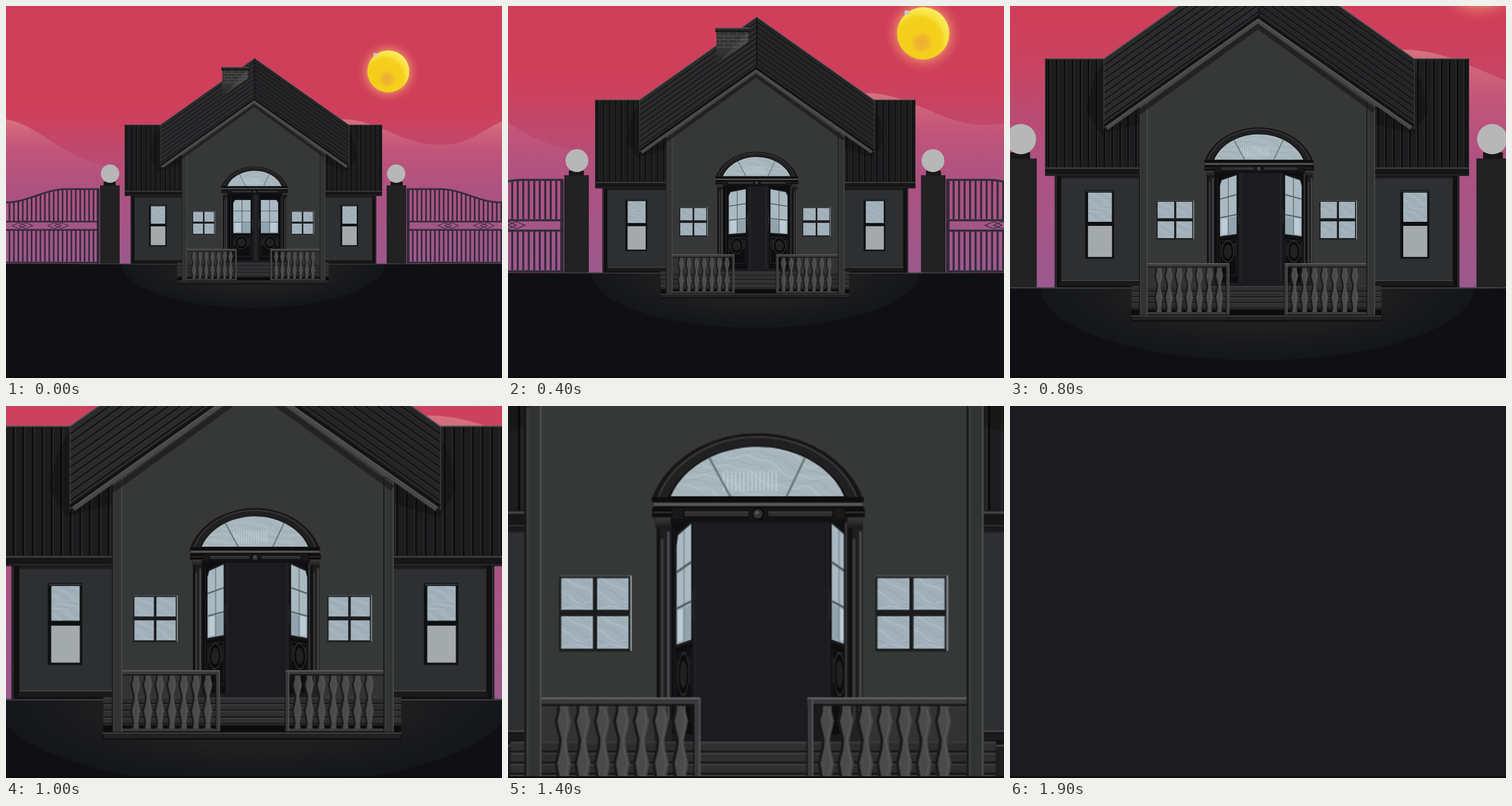
These frames come from a looping animation (864x648 px, 2100 ms). An HTML page with a canvas:

```html
<!DOCTYPE html>
<html lang="en">
<head>
<meta charset="utf-8">
<title>Into the house</title>
<style>
html, body { margin: 0; width: 100%; height: 100%; overflow: hidden; background: #0f0f14; }
canvas { display: block; width: 100%; height: 100%; }
</style>
</head>
<body>
<canvas id="stage" width="864" height="648"></canvas>
<script>
const WIDTH = 864, HEIGHT = 648;
const screen2d = document.getElementById('stage').getContext('2d');
const paper = document.createElement('canvas');
paper.width = WIDTH;
paper.height = HEIGHT;
const ctx = paper.getContext('2d');

const LOOP = 2100, STEP = 100, LAST = 19;
const FOCUS = { x: 432, y: 385 };
// Beyond this zoom the picture is enlarged softly instead of redrawn sharper.
const MAX_DETAIL = 1.7;
// Camera distance at chosen steps; zoom is its inverse.
const DISTANCE = [[0, 1], [14, 0.3125], [17, 0.1825], [19, 0.088]];

function distanceAt(step) {
  const i = DISTANCE.findIndex(([s]) => s >= step);
  if (i === 0) return 1;
  const [s0, d0] = DISTANCE[i - 1], [s1, d1] = DISTANCE[i];
  return d0 + (d1 - d0) * (step - s0) / (s1 - s0);
}

// Drawing helpers
function rect(color, x0, y0, x1, y1) {
  ctx.fillStyle = color;
  ctx.fillRect(x0, y0, x1 - x0, y1 - y0);
}
function trace(points) {
  ctx.beginPath();
  points.forEach(([x, y]) => ctx.lineTo(x, y));
}
function poly(color, points) {
  trace(points);
  ctx.closePath();
  ctx.fillStyle = color;
  ctx.fill();
}
function line(color, width, ...points) {
  trace(points);
  ctx.strokeStyle = color;
  ctx.lineWidth = width;
  ctx.stroke();
}
function disc(color, x, y, r) {
  ctx.beginPath();
  ctx.arc(x, y, r, 0, Math.PI * 2);
  ctx.fillStyle = color;
  ctx.fill();
}
function fillStops(gradient, stops) {
  stops.forEach(([at, color]) => gradient.addColorStop(at, color));
  return gradient;
}
const vertical = (y0, y1, stops) => fillStops(ctx.createLinearGradient(0, y0, 0, y1), stops);
const horizontal = (x0, x1, stops) => fillStops(ctx.createLinearGradient(x0, 0, x1, 0), stops);
const radial = (x, y, r, stops) => fillStops(ctx.createRadialGradient(x, y, 0, x, y, r), stops);

function mirrored(sum, draw) {
  draw();
  ctx.save();
  ctx.translate(sum, 0);
  ctx.scale(-1, 1);
  draw();
  ctx.restore();
}

function swirls(x0, y0, x1, y1, gap) {
  for (let i = 0, y = y0 - 14; y < y1 + 8; i++, y += gap) {
    const points = [];
    for (let x = x0; x <= x1; x += 1) {
      const u = x - x0;
      points.push([x, y + 2.2 * Math.sin(u * 0.17 + i * 0.9) + Math.sin(u * 0.41 + i * 2.3) + u * 0.3]);
    }
    line(i % 2 ? 'rgba(205,222,228,.3)' : 'rgba(120,145,156,.22)', 0.7, ...points);
  }
}
function glass(x0, y0, x1, y1) {
  ctx.save();
  ctx.beginPath();
  ctx.rect(x0, y0, x1 - x0, y1 - y0);
  ctx.clip();
  rect('#a1b0b9', x0, y0, x1, y1);
  swirls(x0, y0, x1, y1, 3.1);
  ctx.restore();
}

// Scenery
function drawSky() {
  rect(vertical(170, 449, [[0, '#cf3f5a'], [0.12, '#cb425f'], [0.5, '#af5180'], [1, '#9b598d']]),
    -10, -10, 874, 450);
  ctx.fillStyle = vertical(195, 320,
    [[0, 'rgba(235,200,180,.38)'], [0.45, 'rgba(210,150,180,.16)'], [1, 'rgba(200,130,180,0)']]);
  ctx.beginPath();
  ctx.moveTo(-10, 196);
  ctx.bezierCurveTo(55, 200, 95, 268, 185, 279);
  ctx.lineTo(185, 330);
  ctx.lineTo(-10, 330);
  ctx.fill();
  ctx.beginPath();
  ctx.moveTo(560, 200);
  ctx.bezierCurveTo(640, 185, 680, 242, 755, 242);
  ctx.bezierCurveTo(810, 242, 830, 214, 874, 196);
  ctx.lineTo(874, 330);
  ctx.lineTo(560, 330);
  ctx.fill();
}

function drawSun() {
  const x = 666, y = 114;
  disc(radial(x, y, 54, [[0.6, 'rgba(250,190,110,.75)'], [0.75, 'rgba(240,150,105,.4)'], [1, 'rgba(225,90,95,0)']]), x, y, 54);
  disc(radial(x - 6, y + 10, 50, [[0, '#f4cb1c'], [0.64, '#f5d01c'], [0.76, '#f8e240'], [1, '#faf06a']]), x, y, 36.5);
  disc(radial(x - 2, y + 13, 17, [[0, '#eeac35'], [0.6, '#f0b92b'], [1, 'rgba(245,208,28,0)']]), x - 2, y + 13, 17);
  rect('#c3cbd0', 640, 82, 646, 88);
}

const railHeight = x => x > 105 ? 319 : 330.5 + 11.5 * Math.cos(Math.PI * Math.max(0, x) / 105);

function drawFence() {
  const iron = '#332a3a', shine = '#574b5b';
  const curve = [];
  for (let x = -8; x <= 162; x += 5) curve.push([x, railHeight(x)]);
  for (let x = -3; x < 158; x += 7.7) {
    rect(iron, x, railHeight(x), x + 2.8, 375);
    rect(iron, x, 391, x + 2.8, 447);
  }
  line(iron, 3, ...curve);
  line(shine, 0.5, ...curve.map(([x, y]) => [x, y - 1.4]));
  [375.5, 390, 447].forEach(y => {
    rect(iron, -8, y - 1.5, 163, y + 1.5);
    rect(shine, -8, y - 1.5, 163, y - 1);
  });
  [28.5, 90.5].forEach(cx => [-6, 6].forEach(shift => {
    const x = cx + shift;
    line(iron, 1.1, [x - 12, 382.5], [x, 377.5], [x + 12, 382.5], [x, 387.5], [x - 12, 382.5]);
  }));
  rect(iron, 158, 318, 163, 449);
  rect('#222222', 164, 312.5, 198, 449);
  rect('#181818', 164, 312.5, 165, 449);
  rect('#171717', 170, 306, 191, 313);
  disc('#b7b7b7', 181.3, 292, 16);
}

function drawGround() {
  rect('#0f0f14', -10, 449, 874, 660);
  ctx.save();
  ctx.beginPath();
  ctx.rect(-10, 449, 884, 100);
  ctx.clip();
  ctx.translate(431, 449);
  ctx.scale(1, 77 / 229);
  disc(radial(0, 0, 229, [[0, '#242322'], [0.55, '#201f1f'], [0.75, '#191a1d'], [1, '#13161a']]), 0, 0, 229);
  ctx.restore();
  rect(horizontal(70, 800, [[0, 'rgba(70,70,72,0)'], [0.2, '#464648'], [0.8, '#464648'], [1, 'rgba(70,70,72,0)']]),
    70, 448.6, 800, 450);
}

// House
function drawWing() {
  const inner = 308;
  rect('#101011', 217, 328, inner, 449);
  rect('#2e2f31', 224, 332, inner, 441.5);
  rect('#47484a', 218, 331, 218.7, 449);
  rect('#1b1b1d', 224, 331, inner, 333.5);
  rect('#48494b', 224, 441.3, inner, 442.2);
  rect('#1a1a1b', 223, 443, inner, 447);

  rect('#1d1d1f', 207, 207, inner, 323);
  for (let x = 210; x < 306; x += 8.4) {
    rect('#0b0b0c', x, 207, x + 1.6, 322);
    rect('#333335', x + 1.6, 207, x + 2.3, 322);
  }
  poly('rgba(5,5,6,.25)', [[269, 210], [258, 230], [250, 262], [266, 288], [inner, 275], [inner, 255], [269, 281]]);
  rect('#535355', 207, 206.5, 270, 207.5);
  rect('#0e0e0f', 207, 207, 208.4, 331);
  rect('#4b4b4d', 206.6, 207, 207.2, 331);
  rect('#161617', 207, 321.5, inner, 331);
  rect('#434345', 207, 322, inner, 323.4);
  rect('#303032', 207, 329.5, inner, 330.3);
}

function drawTallWindow(x) {
  rect('#0f1011', x, 346, x + 30.5, 418.6);
  rect('#59626a', x + 1, 347, x + 29.5, 347.6);
  glass(x + 3, 348.6, x + 28.4, 379.5);
  rect('#a4a9ab', x + 3, 383.8, x + 28.4, 416.6);
}

function drawMainWall() {
  poly('#363837', [[432, 166], [555, 256], [555, 448], [306, 448], [306, 256]]);
}

function drawMainRoof() {
  const slope = 116 / 164;
  const sides = [['#2b2b2d', 269], ['#252527', 597.5]];
  sides.forEach(([color, edge]) => {
    const drop = Math.abs(edge - 433) * slope;
    poly(color, [[433, 91], [edge, 91 + drop], [edge, 165 + drop], [433, 165]]);
    for (let dy = 7; dy < 73; dy += 7.4) {
      line('#0e0e10', 1.2, [433, 91 + dy], [edge, 91 + dy + drop]);
      line('#3b3b3d', 0.5, [433, 92 + dy], [edge, 92 + dy + drop]);
    }
    line('#555557', 1, [433, 91], [edge, 91 + drop]);
    line('#3e3e40', 0.9, [edge, 91 + drop], [edge, 165 + drop]);
  });
  line('#111113', 1.4, [433, 92], [433, 165]);
  drawChimney();
  line('rgba(20,21,21,.6)', 5, [306, 264], [432, 173], [555, 262]);
  line('#131315', 3, [269, 278], [432, 162.5], [597, 278]);
  line('#48484a', 4, [272, 280.5], [432, 167], [594, 280.5]);
  line('#5d5d5f', 0.7, [271, 279], [432, 165.2], [595, 279]);
}

function drawChimney() {
  const body = [[376.6, 111], [421.6, 111], [421.6, 126], [376.6, 157.8]];
  poly(vertical(112, 158, [[0, '#343535'], [0.5, '#343535'], [1, '#242526']]), body);
  ctx.save();
  trace(body);
  ctx.clip();
  for (let row = 0; row < 4; row++) {
    const y = 117 + row * 5.3;
    rect('#5a5b5b', 377, y, 422, y + 0.7);
    for (let x = 381 + (row % 2) * 6; x < 422; x += 12) rect('#5a5b5b', x, y - 5.3, x + 0.7, y);
  }
  poly('rgba(150,150,150,.14)', [[377, 157], [421, 112], [421, 126]]);
  ctx.restore();
  rect('#252526', 375, 106, 423, 112);
  rect('#5c5c5e', 375, 106, 423, 107.2);
  rect('#121213', 375, 110.5, 423, 112);
}

function drawSmallWindow(x) {
  rect('#1b1c1e', x, 357, x + 39.4, 398.3);
  rect('#adbcc2', x + 38.8, 357, x + 39.5, 398);
  rect('#5e686e', x, 357, x + 39, 357.5);
  [[1, 18.6], [20.6, 37.8]].forEach(([a, b]) => {
    glass(x + a, 358.3, x + b, 375.8);
    glass(x + a, 379, x + b, 396.9);
  });
}

// Upper part of an ellipse, cut off by a level base
function dome(color, halfWidth, base, height) {
  const sunk = 13, ry = height + sunk;
  const cut = Math.asin(sunk / ry);
  ctx.beginPath();
  ctx.ellipse(432.8, base + sunk, halfWidth / Math.cos(cut), ry, 0, Math.PI + cut, -cut);
  ctx.closePath();
  ctx.fillStyle = color;
  ctx.fill();
}

function drawArch() {
  dome('#161618', 58, 316.5, 37);
  dome('#3a3a3c', 55, 315.5, 34.5);
  dome('#202022', 54, 315.5, 33.5);
  dome('#0d0d0e', 49, 315.3, 29);
  dome('#a8b6bc', 47.2, 313.8, 26.9);
  ctx.save();
  ctx.clip();
  swirls(385, 282, 480, 312, 4.2);
  for (let x = 414; x < 444; x += 2.2) rect('rgba(215,228,235,.5)', x, 300, x + 0.8, 311);
  line('#68757b', 1.1, [405, 290], [418, 314]);
  line('#68757b', 1.1, [460, 290], [448.6, 314]);
  ctx.restore();
  rect('#0e0e0f', 375.4, 314.2, 490.6, 317);
}

function drawDoor(step) {
  const hinge = 386.2, width = 48.3, eye = 436;
  const open = 1 - 0.0525 * step;
  const lean = 0.118 * Math.sqrt(1 - open * open);
  const at = ([x, y]) => [
    hinge + (x - hinge) * open,
    eye + (y - eye) * (1 + lean * (x - hinge) / width)
  ];
  const panel = (color, x0, y0, x1, y1) =>
    poly(color, [[x0, y0], [x1, y0], [x1, y1], [x0, y1]].map(at));
  const stroke = (color, w, ...points) => line(color, w, ...points.map(at));

  panel('#0e0e10', hinge, 320, 434.5, 443);
  panel('#29292b', 391, 333, 392, 438);
  panel('#1d1d20', 429, 322, 434, 443);
  panel('#39393b', 433.7, 322, 434.5, 443);
  poly('#1a1d1f', [[394.5, 342], [398, 336.5], [427.5, 336.5], [427.5, 397], [394.5, 397]].map(at));
  poly('#a8b9c2', [[396, 343], [399, 338], [426, 338], [426, 395.5], [396, 395.5]].map(at));
  panel('rgba(205,220,228,.55)', 399, 378, 409, 394);
  panel('rgba(110,130,142,.4)', 412, 378, 426, 395);
  stroke('#525c62', 1.2 * open, [411, 338], [411, 396]);
  [357, 376.5].forEach(y => stroke('#525c62', 1.2, [396, y], [426, y]));
  const ring = (color, radius) => {
    const points = [];
    for (let a = 0; a < 6.3; a += 0.3) points.push(at([410 + radius * Math.cos(a), 412 + radius * Math.sin(a)]));
    poly(color, points);
  };
  stroke('#252628', 1.2 * open, [396, 401], [426, 401], [426, 436], [396, 436], [396, 401]);
  panel('#1b1c1e', 397, 404, 403, 417);
  panel('#1b1c1e', 418, 404, 425, 417);
  ring('#2a2b2d', 11.5);
  ring('#0b0b0c', 10.2);
  ring('#202123', 7);
  stroke('#303133', 1.6 * open, [430.5, 371], [429, 378], [430.5, 387]);
}

function drawEntrance(step) {
  rect('#1c1b1f', 385, 326, 483, 447.5);
  ctx.save();
  ctx.beginPath();
  ctx.rect(385, 327, 100, 120.5);
  ctx.clip();
  mirrored(870, () => drawDoor(step));
  ctx.restore();
  rect('#161617', 479.8, 327, 483, 447.5);
  rect('#39393b', 480.5, 328, 481.6, 447.5);

  rect('#19191b', 377, 316, 490, 328);
  rect('#555557', 376.5, 317.3, 490, 319.3);
  rect('#0e0e0f', 376, 319.3, 490.5, 320.4);
  rect('#111113', 386, 326.2, 481, 328);
  mirrored(866.6, () => {
    rect('#0d0d0e', 375.4, 320.4, 386.4, 325.3);
    rect('#3b3b3d', 376, 322.3, 386, 323);
    rect('#0c0c0d', 392.2, 321.3, 428.6, 325.7);
    rect('#303033', 393, 322.2, 428, 324.8);
    rect('#48484a', 393, 322, 428, 322.5);
  });
  [377.3, 481.8].forEach(drawColumn);
  disc('#0c0c0d', 433.2, 323.5, 3.6);
  disc('#343437', 433, 323.4, 2.5);
  disc('#58585b', 432.6, 322.8, 1);
}

// Both columns catch the light from the same side.
function drawColumn(x) {
  rect('#1e1e20', x + 0.7, 328, x + 8.3, 447);
  rect('#111112', x + 0.7, 331, x + 2.4, 447);
  rect('#39393b', x + 2.8, 337, x + 4.4, 447);
  rect('#4a4a4d', x + 6.3, 333, x + 7.7, 447);
  rect(vertical(325, 332, [[0, '#3a3a3c'], [0.5, '#29292b'], [1, '#121213']]), x, 325.3, x + 8.2, 331.6);
  rect('#252527', x - 0.5, 436, x + 9, 447.5);
}

function drawSteps() {
  rect('#161617', 298.4, 447.5, 562.5, 479);
  for (let y = 447.5; y < 472; y += 6) {
    rect('#303032', 298.4, y, 562.5, y + 4.8);
    rect('#454547', 298.4, y, 562.5, y + 0.7);
  }
  rect('#0c0c0d', 298.4, 472, 562.5, 479);
  rect('#111112', 298, 478, 563, 485);
  rect('#434345', 298, 478.5, 563, 479.6);
  rect('#232325', 299, 480, 562, 483.3);
}

function baluster(x, color) {
  const half = [[427, 2.4], [431, 2.4], [436, 3.7], [440, 2.9], [446, 1.4], [451, 1.8], [459, 3.7], [464, 2.9], [470, 1.9], [476, 2.6]];
  poly(color, [...half.map(([y, w]) => [x + w, y]), ...half.map(([y, w]) => [x - w, y]).reverse()]);
}

function drawRailing(x0, x1, firstBaluster, post) {
  rect('rgba(15,15,16,.1)', x0, 427, x1, 476);
  for (let i = 0; i < 7; i++) {
    const x = firstBaluster + i * 10.63;
    baluster(x - 1.5, '#18191a');
    baluster(x, '#4a4a4b');
    line('#5a5a5b', 0.6, [x + 1, 430], [x + 2.2, 436], [x, 447], [x + 2.2, 459], [x, 470]);
  }
  rect('#3a3a3c', x0, 423.5, x1, 427);
  rect('#636365', x0, 423.3, x1, 424.3);
  rect('#151516', x0, 427, x1, 428);
  rect('#3b3b3d', x0, 475, x1, 477.5);
  rect('#3a3a3c', post, 424.3, post + 3.2, 477.5);
  rect('#5a5a5c', post + 2.5, 424, post + 3.2, 477);
  rect('#161617', post - 0.6, 428, post, 476);
}

function drawPorchPost(x) {
  rect('#323433', x, 252, x + 8.6, 478);
  rect('#131415', x - 0.5, 252, x + 0.4, 478);
  rect('#4d4f4f', x + 7.8, 252, x + 8.7, 478);
  rect('#424443', x + 0.9, 254, x + 1.5, 478);
}

function zoomAbout(context, scale) {
  context.setTransform(scale, 0, 0, scale, FOCUS.x * (1 - scale), FOCUS.y * (1 - scale));
}

function drawScene(step) {
  const zoom = 1 / distanceAt(step);
  const detail = Math.min(zoom, MAX_DETAIL);
  zoomAbout(ctx, detail);
  drawSky();
  drawSun();
  mirrored(861, drawFence);
  drawGround();
  mirrored(862, drawWing);
  [249.2, 582.6].forEach(drawTallWindow);
  drawMainWall();
  [324.8, 497].forEach(drawSmallWindow);
  drawEntrance(step);
  drawArch();
  drawSteps();
  drawRailing(314.8, 401.7, 327.6, 398.5);
  drawRailing(460, 547.5, 470.8, 460);
  [306.5, 547.2].forEach(drawPorchPost);
  drawMainRoof();

  zoomAbout(screen2d, zoom / detail);
  screen2d.imageSmoothingQuality = 'high';
  screen2d.drawImage(paper, 0, 0);
  screen2d.resetTransform();
  if (step === LAST) {
    screen2d.fillStyle = '#1c1b1f';
    screen2d.fillRect(0, 0, WIDTH, HEIGHT);
  }
  screen2d.fillStyle = '#10090d';
  screen2d.fillRect(0, 645, WIDTH, 3);
}

let shown = -1;
function tick() {
  const step = Math.min(LAST, Math.floor(performance.now() % LOOP / STEP));
  if (step !== shown) drawScene(shown = step);
  requestAnimationFrame(tick);
}
tick();
</script>
</body>
</html>
```
